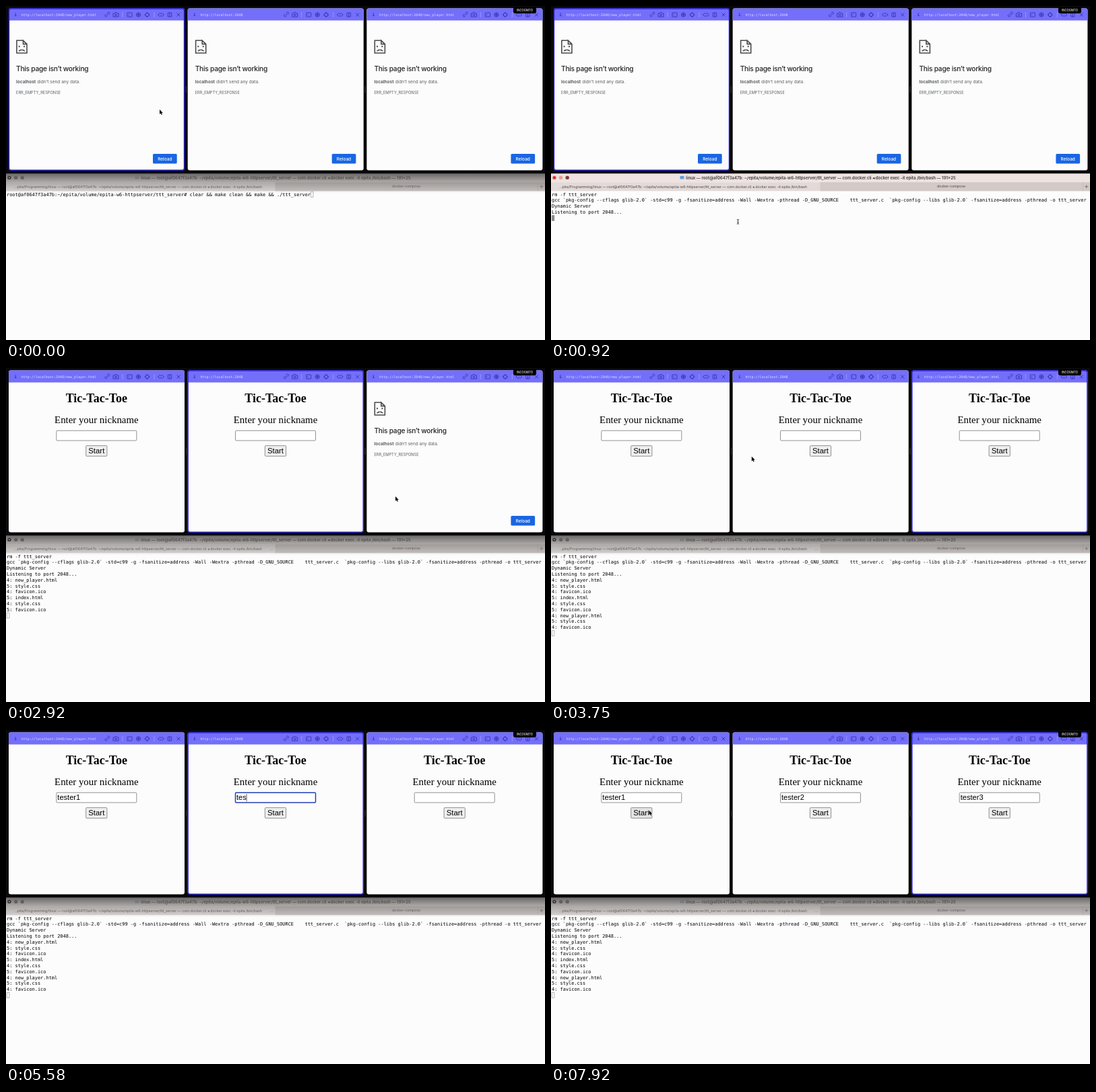
Animation, 800 px wide and 497 px high, one loop 8000 ms. Source, as an HTML page with a canvas:

```html
<!DOCTYPE html>
<html lang="en">
<head>
<meta charset="utf-8">
<title>Tic-Tac-Toe server</title>
<style>
  html, body { margin: 0; width: 100%; height: 100%; overflow: hidden; background: #fcfcfc; }
  canvas { display: block; width: 800px; height: 497px; }
</style>
</head>
<body>
<canvas id="stage"></canvas>
<script>
const W = 800, H = 497, FPS = 12, LOOP = 8000;
const canvas = document.getElementById('stage');
const dpr = window.devicePixelRatio || 1;
canvas.width = W * dpr;
canvas.height = H * dpr;
const c = canvas.getContext('2d');

const UI = 'Inter, "Noto Sans CJK KR", "Noto Sans CJK", sans-serif';
const MONO = '"DejaVu Sans Mono", monospace';
const SERIF = '"Liberation Serif", serif';
const SANS = '"Liberation Sans", sans-serif';
const PAPER = '#fcfcfc';

// All times below are ticks of 1/12 s.
const PANELS = [
  { url: 'http://localhost:2048/new_player.html', loaded: 25, name: 'tester1', focus: 48, typing: 52, blur: 64 },
  { url: 'http://localhost:2048', loaded: 32, name: 'tester2', focus: 63, typing: 65, blur: 75 },
  { url: 'http://localhost:2048/new_player.html', loaded: 42, name: 'tester3', focus: 75, typing: 80, blur: 88 },
];
const PITCH = 265.7;
const ACTIVE = [[0, 0], [28, 1], [39, 2], [48, 0], [63, 1], [75, 2]];
const TERMINAL_FOCUS = [4, 19];
const CWD = '~/epita/volume/epita-w6-httpserver/ttt_server';
const PROMPT = 'root@af0647f3a47b:' + CWD + '# clear && make clean && make && ./ttt_server';
const SESSION = 'linux — root@af0647f3a47b: ' + CWD + ' — com.docker.cli ◂ docker exec -it epita /bin/bash';
const LOG = [
  [6, 'rm -f ttt_server'],
  [6, 'gcc `pkg-config --cflags glib-2.0` -std=c99 -g -fsanitize=address -Wall -Wextra -pthread -D_GNU_SOURCE    ttt_server.c  `pkg-config --libs glib-2.0` -fsanitize=address -pthread -o ttt_server'],
  [9, 'Dynamic Server'],
  [9, 'Listening to port 2048...'],
  [21, '4: new_player.html'],
  [24, '5: style.css'],
  [25, '4: favicon.ico'],
  [29, '5: index.html'],
  [31, '4: style.css'],
  [32, '5: favicon.ico'],
  [40, '4: new_player.html'],
  [41, '5: style.css'],
  [42, '4: favicon.ico'],
];
const POINTER = [
  [0, 228, 154], [5, 277.5, 321], [11, 277.5, 321], [18, 230, 219], [22, 230, 219],
  [28, 500, 222], [31, 500, 222], [35, 578, 191], [38, 766, 222], [41, 766, 222],
  [47, 134, 100], [60, 134, 100], [63, 400, 100], [72, 400, 100], [75, 652, 100],
  [88, 652, 100], [95, 145.5, 119.5],
];

function text(str, x, y, font, color, align = 'left', spacing = 0) {
  c.font = font;
  c.fillStyle = color;
  c.textAlign = align;
  c.letterSpacing = spacing + 'px';
  c.fillText(str, x, y);
}

function box(x, y, w, h, fill, stroke, radius = 0, line = 0.8) {
  c.beginPath();
  c.roundRect(x, y, w, h, radius);
  if (fill) { c.fillStyle = fill; c.fill(); }
  if (stroke) { c.strokeStyle = stroke; c.lineWidth = line; c.stroke(); }
}

function path(d, stroke, line = 0.8, fill) {
  const p = new Path2D(d);
  if (fill) { c.fillStyle = fill; c.fill(p); }
  if (stroke) { c.strokeStyle = stroke; c.lineWidth = line; c.stroke(p); }
}

function disc(x, y, r, fill, stroke, line = 0.8) {
  box(x - r, y - r, 2 * r, 2 * r, fill, stroke, r, line);
}

function shadow(color, blur, y = 0) {
  c.shadowColor = color;
  c.shadowBlur = blur * dpr;
  c.shadowOffsetY = y * dpr;
}

function pointerAt(k) {
  let i = 0;
  while (i < POINTER.length - 2 && k >= POINTER[i + 1][0]) i++;
  const [ka, xa, ya] = POINTER[i], [kb, xb, yb] = POINTER[i + 1];
  const u = Math.min(1, (k - ka) / (kb - ka)), e = u * u * (3 - 2 * u);
  return { x: xa + (xb - xa) * e, y: ya + (yb - ya) * e };
}

function drawToolbar(url) {
  box(4, 3.6, 261, 18, '#736ffb', null, [3, 3, 0, 0]);
  const ink = '#302ca5';
  text('i', 14, 15, 'bold 6px ' + MONO, ink, 'center');
  text(url, 22.7, 14.8, '5px ' + MONO, '#e2e0ff');
  path('M149 14l3-3m-2 -.5l1-1a1.6 1.6 0 0 1 2.3 2.3l-1 1m-1.6 1.6l-1 1a1.6 1.6 0 0 1-2.3-2.3l1-1', ink);
  path('M159 11h2l1-1.5h2l1 1.5h2v5h-8z', ink);
  disc(163, 13.2, 1.3, null, ink);
  path('M173 9v8M220 9v8', '#a7a4fd', 0.7);
  box(180, 10, 7, 6, null, ink, 0.5);
  path('M181.5 12l1.2 1-1.2 1', ink, 0.6);
  disc(196.5, 13, 3.1, null, ink);
  disc(196.5, 13, 1.3, null, ink);
  path('M193.5 13h6M196.5 10v6', ink, 0.5);
  disc(209.5, 13, 2.8, null, ink);
  path('M209.5 9v2.4m0 3.2v2.4M205.5 13h2.4m3.2 0h2.4', ink);
  path('M228.5 10.5l-3 2.5 3 2.5M231.5 10.5l3 2.5-3 2.5M228.5 10.5l1.5 1.3 1.5-1.3M228.5 15.5l1.5-1.3 1.5 1.3', ink);
  box(240.3, 10, 5.4, 6, null, ink, 0.4);
  path('M243 10v6', ink);
  path('M253.5 10.5l5 5m0-5l-5 5', ink);
}

function drawErrorPage() {
  const ink = '#4a4a4a';
  path('M25.5 51.3H15.9V70H31V56.6L25.5 51.3V56.6H31', ink, 1.6);
  path('M18.6 59.2h2v2h-2zM26 59.2h2v2h-2z', null, 0, ink);
  path('M19.6 67.6v-1.2h1.6v-1h4.6v1h1.6v1.2', ink, 1.2);
  text('This page isn’t working', 15, 97, '500 10.2px ' + UI, '#202124', 'left', -0.25);
  text('localhost', 15, 115, 'bold 6.5px ' + UI, '#5c5e62');
  text('didn’t send any data.', 46.3, 115, '6.5px ' + UI, '#5c5e62');
  text('ERR_EMPTY_RESPONSE', 15, 131, '5.7px ' + UI, '#5c5e62');
  box(218, 220, 35.7, 14.6, '#1a66e2', null, 1.6);
  text('Reload', 235.8, 229.7, '500 6.5px ' + UI, '#fff', 'center');
}

function drawForm(panel, k, pointer) {
  const mid = 134.3;
  text('Tic-Tac-Toe', mid, 51, 'bold 18px ' + SERIF, '#000', 'center');
  text('Enter your nickname', mid, 81.7, '14.85px ' + SERIF, '#000', 'center');

  const focused = k >= panel.focus && k < panel.blur;
  const typed = panel.name.slice(0, Math.max(0, k - panel.typing + 1));
  box(74.8, 93.2, 119, 14.8, '#fff', focused ? '#2340b5' : '#777', 1.2, focused ? 1.5 : 0.8);
  text(typed, 76.3, 104.3, '11.1px ' + SANS, '#000');
  if (focused) {
    const caret = 76.6 + c.measureText(typed).width;
    path(`M${caret} 95v11.5`, '#000', 0.6);
  }

  const hover = Math.abs(pointer.x - mid) < 16 && pointer.y > 115 && pointer.y < 132;
  box(118.7, 115.6, 31.2, 15.6, hover ? '#e3e3e3' : '#efefef', '#777', 1);
  text('Start', mid, 127.4, '11.4px ' + SANS, '#000', 'center');

  if (focused && k < panel.typing) {
    shadow('rgba(0,0,0,.35)', 2.5, 0.6);
    box(119.6, 113.5, 51, 19.5, '#fff', null, 1.5);
    shadow('transparent', 0);
    text('박도담 EPITA', 125.7, 125, '5.3px ' + UI, '#222');
  }
}

function drawBrowsers(k, pointer) {
  c.fillStyle = '#09090b';
  c.fillRect(0, 0, W, 249.3);
  const active = ACTIVE.filter(([at]) => k >= at).pop()[1];
  PANELS.forEach((panel, i) => {
    c.save();
    c.translate(i * PITCH, 0);
    box(4, 3.6, 261, 241, PAPER, null, 3);
    drawToolbar(panel.url);
    const local = { x: pointer.x - i * PITCH, y: pointer.y };
    if (k >= panel.loaded) drawForm(panel, k, local);
    else drawErrorPage();
    if (i === active) box(4.5, 4, 260, 240.2, null, '#2a22d2', 3, 1.4);
    if (i < 2) box(266.8, 119, 1, 10, '#38383c', null, 0.5);
    c.restore();
  });
  box(753, 2, 34, 9, '#000', null, [0, 0, 3, 3]);
  text('INCOGNITO', 770, 8.3, '500 4.2px ' + UI, '#eee', 'center');
}

function drawTerminal(k) {
  const focused = k >= TERMINAL_FOCUS[0] && k < TERMINAL_FOCUS[1];
  c.fillStyle = PAPER;
  c.fillRect(0, 249, W, H - 249);
  c.fillStyle = focused ? '#eee3e1' : '#dcd7d5';
  c.fillRect(0, 249.3, W, 13);
  c.fillStyle = focused ? '#e3dad8' : '#dcd8d6';
  c.fillRect(0, 262.3, W, 13);
  c.fillStyle = focused ? '#d3cac8' : '#cbc6c4';
  c.fillRect(399.5, 262.3, W - 399.5, 13);
  path('M789.5 262.3v13', '#bbb4b2', 0.6);
  if (!focused) {
    const fade = c.createLinearGradient(0, 249, 0, 279);
    fade.addColorStop(0, 'rgba(0,0,0,.52)');
    fade.addColorStop(0.4, 'rgba(0,0,0,.24)');
    fade.addColorStop(1, 'rgba(0,0,0,0)');
    c.fillStyle = fade;
    c.fillRect(0, 249, W, 30);
  }

  const lights = focused ? ['#ee4b46', '#e99f8c', '#7b3d3c'] : ['#393637', '#625e5d', '#625e5d'];
  lights.forEach((color, i) => disc(5 + 9.6 * i, 255.4, 2.7, color));
  disc(5, 255.4, 0.9, focused ? '#7c1512' : '#aaa6a4');
  box(191.5, 253, 6, 4.6, focused ? '#5d9fda' : '#77797c', null, 0.7);
  text(SESSION + ' — 191×25', 200.3, 257.5, '600 6.05px ' + UI, focused ? '#3d3836' : '#514d4b');
  const tabInk = focused ? '#4a4543' : '#625e5c';
  text('…pita/Programming/' + SESSION, 12, 270.6, '5.3px ' + UI, tabInk);
  text('docker-compose', 594, 270.4, '5.2px ' + UI, tabInk, 'center');
  path('M792.3 268.7h5M794.8 266.2v5', tabInk, 0.6);
  if (k >= 21) text('…', 394, 271, '6px ' + UI, tabInk, 'center');

  const lines = k < LOG[0][0] ? [PROMPT] : LOG.filter(([at]) => k >= at).map(line => line[1]);
  const rowY = row => 282.7 + row * 8.78;
  lines.forEach((line, row) => text(line, 1, rowY(row), '6.945px ' + MONO, '#000'));
  const atPrompt = lines[0] === PROMPT;
  const x = atPrompt ? 1 + c.measureText(PROMPT).width : 1;
  const y = rowY(atPrompt ? 0 : lines.length) - 6.6;
  if (focused) box(x, y, 4.2, 8.6, '#8a8a8a');
  else box(x + 0.3, y + 0.3, 3.6, 8, null, '#9a9a9a', 0, 0.7);
}

function drawPointer(k, { x, y }) {
  if (PANELS.some(p => k >= p.typing && k < p.typing + 8 && !(k >= 60 && k < 65) && !(k >= 72 && k < 80))) return;
  const overInput = y > 93 && y < 108 && PANELS.some((p, i) => k >= p.loaded && Math.abs(x - 134.3 - i * PITCH) < 60);
  c.save();
  c.translate(x, y);
  if (y > 275 || overInput) {
    const beam = 'M-1.6 -3.4Q0 -3.4 0 -2.4Q0 -3.4 1.6 -3.4M0 -2.4V2.4M-1.6 3.4Q0 3.4 0 2.4Q0 3.4 1.6 3.4M-.9 .9h1.8';
    path(beam, '#fff', 1.6);
    path(beam, '#111', 0.8);
  } else {
    path('M0 0V7L1.6 5.6L2.7 8L3.8 7.5L2.8 5.2H4.9Z', '#fff', 1.2, '#000');
    path('M0 0V7L1.6 5.6L2.7 8L3.8 7.5L2.8 5.2H4.9Z', null, 0, '#000');
  }
  c.restore();
}

function render(now) {
  const k = Math.floor(((now % LOOP) + 5) * FPS / 1000) % (LOOP * FPS / 1000);
  const pointer = pointerAt(k);
  c.setTransform(dpr, 0, 0, dpr, 0, 0);
  drawTerminal(k);
  drawBrowsers(k, pointer);
  drawPointer(k, pointer);
}

const start = performance.now();
function loop() {
  render(performance.now() - start);
  requestAnimationFrame(loop);
}
loop();
</script>
</body>
</html>
```
